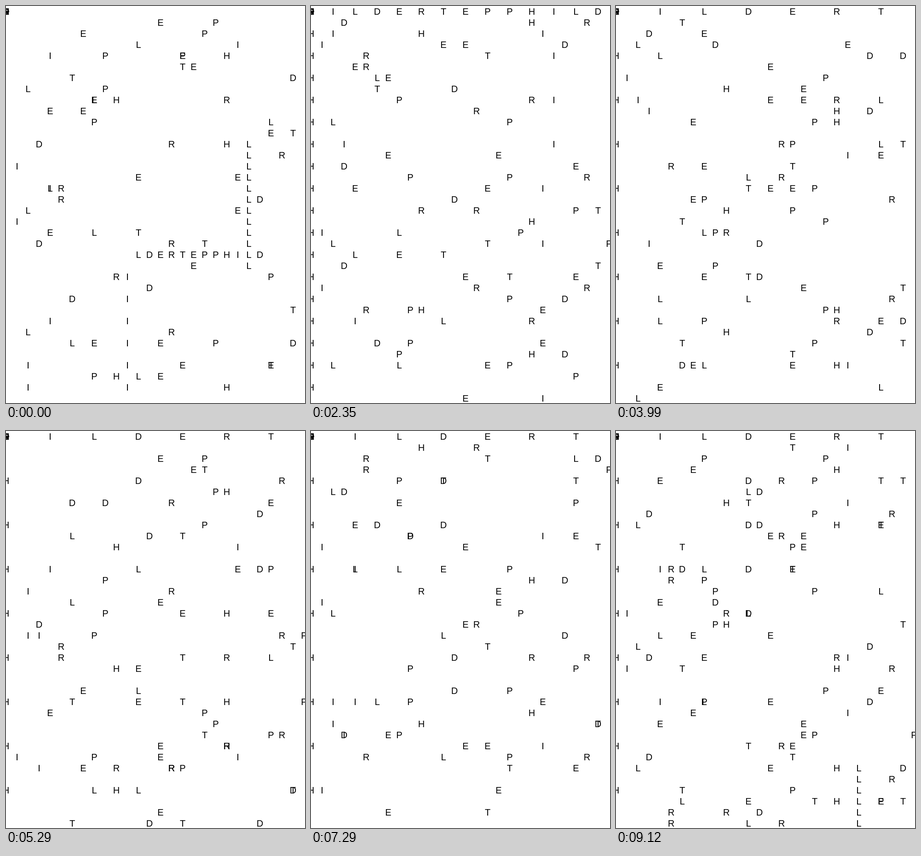
These frames come from a looping animation (650 px wide and 862 px high, 9.18 s). An HTML page with a canvas:

```html
<!DOCTYPE html>
<html lang="de">
<head>
<meta charset="utf-8">
<title>Letter grid</title>
<style>
  html, body { margin: 0; width: 100%; height: 100%; overflow: hidden; background: #fff; }
  canvas { display: block; }
</style>
</head>
<body>
<canvas id="stage" width="650" height="862"></canvas>
<script>
const NAME = "HILDERTEPP";
const LOOP = 9180;
const CELL = 24, COLS = 27, ROWS = 36, TOP = 12;
const CAP_HALF = 7;

const stage = document.getElementById("stage");
const ctx = stage.getContext("2d");
ctx.font = "20px 'Liberation Sans', Arial, sans-serif";
ctx.textAlign = "center";

// 30 steps per second on a 10 ms clock, after a short first step of 20 ms
function stepAt(ms) {
  return Math.max(0, 1 + Math.floor((Math.floor(ms / 10) * 10 - 15) * 0.03));
}

function phaseAt(step) {
  return 0.004 * (step ? 2 * step + 2 : 1);
}

// Each letter's distance from the corner is multiplied by a whole-number wave
function draw(phase) {
  ctx.fillStyle = "#fff";
  ctx.fillRect(0, 0, stage.width, stage.height);
  ctx.fillStyle = "#000";
  for (let row = 0; row < ROWS; row++) {
    for (let col = 0; col < COLS; col++) {
      const spread = Math.floor(5 * Math.sin(2 * row * col + phase));
      const x = col * spread * CELL;
      const y = row * spread * CELL + TOP;
      if (spread < 0 || x > stage.width + CELL || y > stage.height + CELL) continue;
      ctx.fillText(NAME[col % NAME.length], x, y + CAP_HALF);
    }
  }
}

const start = performance.now();
let shown = -1;

function tick() {
  const step = stepAt((performance.now() - start) % LOOP);
  if (step !== shown) {
    shown = step;
    draw(phaseAt(step));
  }
  requestAnimationFrame(tick);
}
tick();
</script>
</body>
</html>
```
